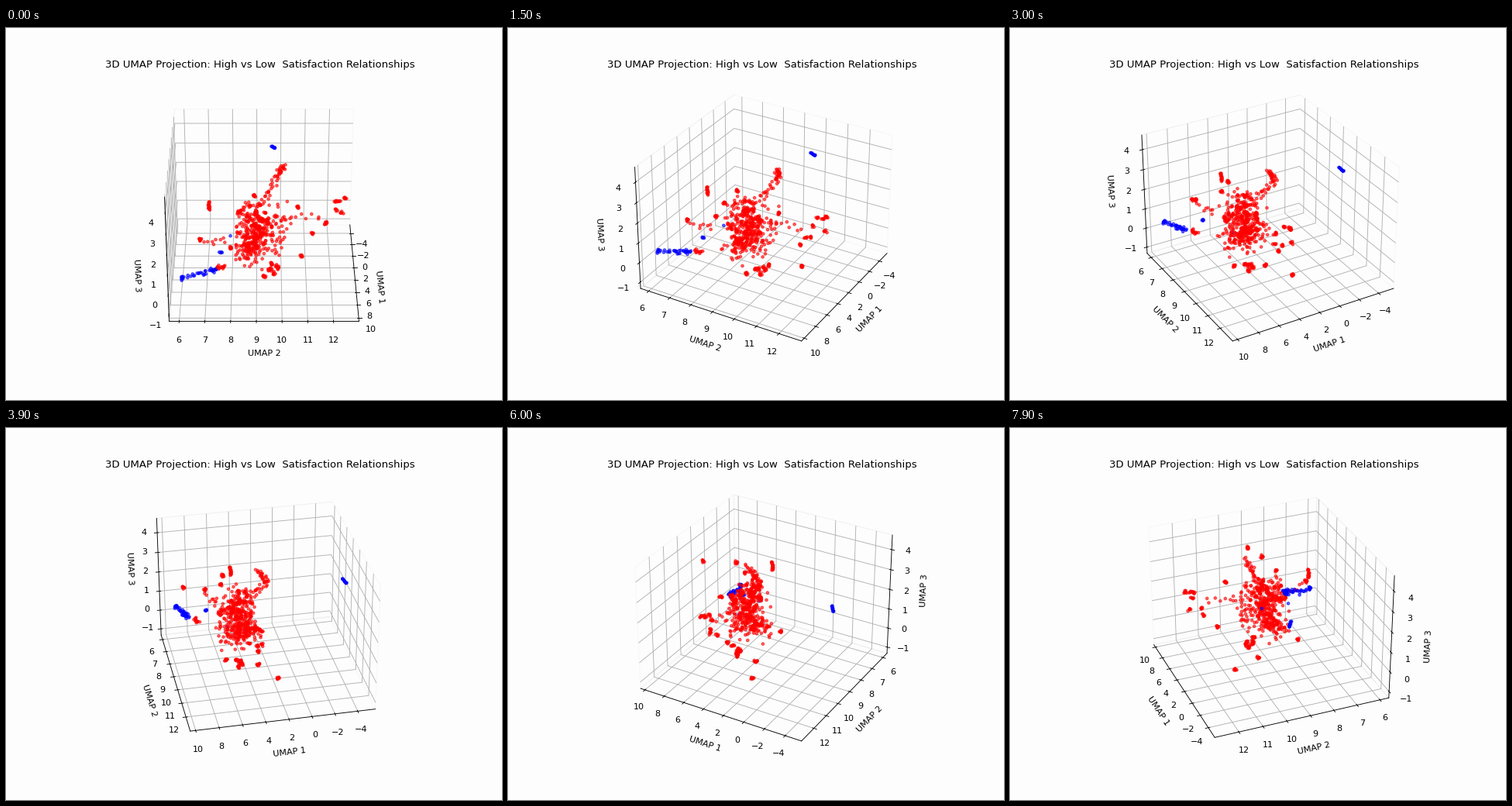
Animation, 640 px wide and 480 px high, one loop 8000 ms. Source, as a matplotlib script:

```python
import numpy as np
import matplotlib.pyplot as plt
from matplotlib.animation import FuncAnimation

FRAMES, STEP_MS, DEG_PER_FRAME = 80, 100, 2
BG = "#fdfdfd"
LOW = np.array([-5.55, 5.61, -1.33])
HIGH = np.array([10.46, 12.99, 4.72])
BOX = np.array([238.1, 238.1, 178.6])  # box edges in layout units

rng = np.random.default_rng(7)


def cloud(n, center, spread):
    """Gaussian blob in layout units, clipped to 2 sigma."""
    return center + np.clip(rng.normal(size=(n, 3)), -2, 2) * spread


def knot(center, n=7):
    return cloud(n, center, 1.1)


def clumps(k, center, spread, n=6):
    """k tight knots scattered around a centre."""
    return np.vstack([knot(c, n) for c in cloud(k, center, spread)])


def strand(n, start, end, spread):
    t = np.linspace(0, 1, n)[:, None]
    line = np.array(start) * (1 - t) + np.array(end) * t
    return line + rng.normal(size=(n, 3)) * spread


def to_data(parts):
    """Layout units (box centre = 0) to axis values."""
    return ((LOW + HIGH) / 2 + np.vstack(parts) / BOX * (HIGH - LOW)).T


# dense core
red = [
    cloud(190, (35, -9, -4), (11, 13, 18)),
    clumps(25, (36, -9, 0), (11, 14, 17), n=4),
    cloud(100, (30, -18, -37), (14, 9, 8)),
    cloud(30, (30, 18, -10), (8, 8, 20)),
]

# arms and loose groups around it
red += [
    strand(24, (14, 26, 77), (-1, 16, 53), 1.5),
    strand(20, (-1, 16, 53), (22, -2, 22), 2.5),
    strand(9, (30, 26, 10), (33, 72, 14), 3),
    clumps(6, (31, 83, 5), (6, 10, 14), n=5),
    strand(10, (63, -81, -3), (55, -48, -12), 2.5),
    strand(12, (82, -59, -35), (79, -49, -33), 1.5),
    strand(14, (31, -69, 33), (30, -69, 20), 0.8),
    clumps(5, (34, 12, -65), (5, 4, 3)),
]

# isolated knots
for center in [(103, -12, 41), (-8, 49, -72), (28, 102, 36), (20, 63, -20),
               (63, -81, -3), (51, -12, 53), (50, -31, 29), (42, 42, 32),
               (51, 0, -66), (10, 10, -73), (2, -43, -52)]:
    red.append(knot(center))

blue = [
    strand(10, (-101, 10, 43), (-105, 15, 38), 0.4),
    knot((99, -102, -38), 9),
    strand(24, (96, -95, -39), (90, -58, -28), 2),
    knot((93, -63, -30)),
    knot((67, -55, -19), 4),
    strand(2, (35, -43, -15), (47, -10, -22), 0),
]

fig = plt.figure(figsize=(8, 6), dpi=80, facecolor=BG)
ax = fig.add_subplot(projection="3d", facecolor=BG)
for parts, color in ((red, "red"), (blue, "blue")):
    ax.scatter(*to_data(parts), c=color, s=10, alpha=0.6)

ax.set_title("3D UMAP Projection: High vs Low  Satisfaction Relationships",
             fontsize=11.92)
ax.set(xlabel="UMAP 1", ylabel="UMAP 2", zlabel="UMAP 3")
ax.set(xlim=(LOW[0], HIGH[0]), ylim=(LOW[1], HIGH[1]), zlim=(LOW[2], HIGH[2]))
for axis in (ax.xaxis, ax.yaxis, ax.zaxis):
    axis.pane.fill = False


def update(i):
    ax.view_init(elev=30, azim=i * DEG_PER_FRAME)
    return []


anim = FuncAnimation(fig, update, frames=FRAMES, interval=STEP_MS,
                     repeat=True, repeat_delay=0, blit=False)
plt.show()
```
